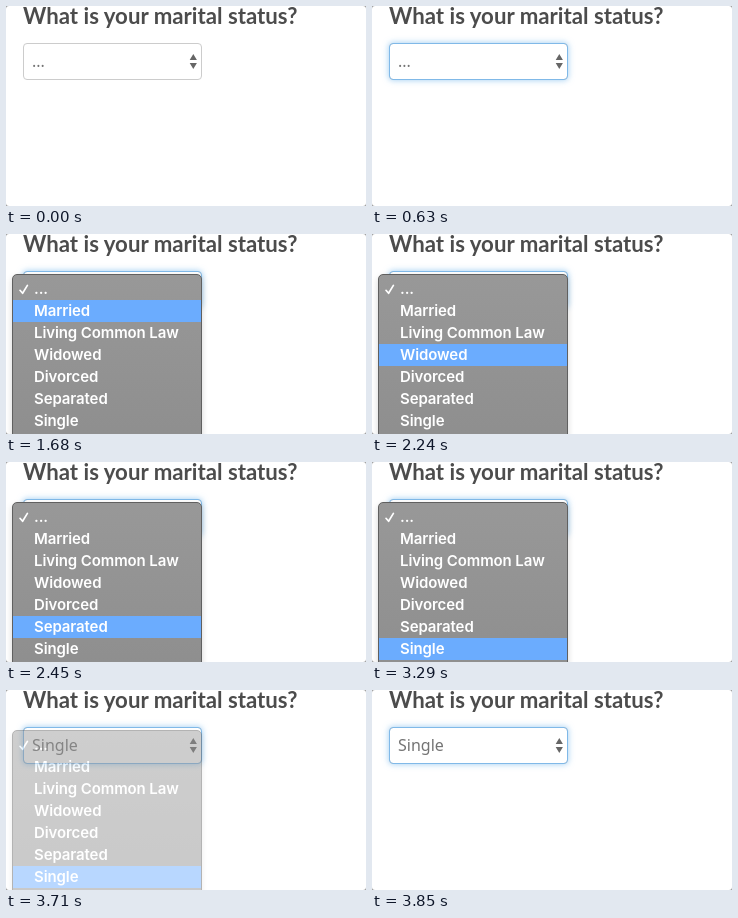
Animation of 360 by 200 pixels, one loop 4480 ms. Source, as an HTML page:

```html
<!DOCTYPE html>
<html lang="en">
<head>
<meta charset="utf-8">
<title>Marital status</title>
<style>
  html, body { margin: 0; width: 100%; height: 100%; overflow: hidden; background: #999; }
  .stage { position: absolute; left: 0; top: 0; width: 360px; height: 200px; overflow: hidden; background: #fff; border-radius: 3px; }
  .stage * { box-sizing: border-box; position: absolute; white-space: nowrap; }

  h1 { left: 17px; top: -4px; margin: 0; font: 700 22.23px/27px Lato, sans-serif; color: #4c4c4c; }

  .select { left: 17px; top: 37px; width: 179px; height: 37px; border: 1px solid #ccc; border-radius: 4px; background: #fff; }
  .focus { inset: -1px; border: 1px solid #80b9e8; border-radius: 4px; box-shadow: 0 0 6px rgba(102, 175, 233, .65); }
  .value { left: 8px; top: 0; font: 16px/34px "Noto Sans", sans-serif; color: #747474; }
  .arrows { left: 165px; top: 9px; width: 9px; height: 17px; fill: #666; }

  .popup { inset: 0; }
  .shade { left: 6px; top: 42px; width: 190px; height: 190px; border-radius: 5px; box-shadow: 0 1px 6px rgba(0, 0, 0, .17); }
  .menu { left: 6px; top: 40px; width: 190px; height: 190px; border: 1px solid #606060; border-radius: 5px; overflow: hidden;
          background: linear-gradient(#989898, #8d8d8d); }
  .bar { left: 0; top: 3px; width: 100%; height: 22px; background: #6bacfe; }
  .menu p { left: 21px; top: calc(3px + 22px * var(--row)); margin: 0; font: 600 15px/22px Inter, sans-serif; letter-spacing: -.1px; color: #fff; }
  .check { left: 5px; top: 8px; width: 12px; height: 13px; fill: none; stroke: #fff; stroke-width: 1.7; stroke-linecap: round; stroke-linejoin: round; }

  .focus, .before, .after, .popup, .bar { animation: 4480ms step-end infinite; }
  .focus { animation-name: focus; }
  .before { animation-name: before; }
  .after { animation-name: after; }
  .popup { animation-name: popup; }
  .bar { animation-name: hover; }

  @keyframes focus { 0% { opacity: 0 } 12.5% { opacity: .5 } 14.0625%, 100% { opacity: 1 } }
  @keyframes before { 0% { opacity: 1 } 79.6875%, 100% { opacity: 0 } }
  @keyframes after { 0% { opacity: 0 } 79.6875%, 100% { opacity: 1 } }
  @keyframes popup {
    0% { opacity: 0 }
    26.5625% { opacity: 1 }
    79.6875% { opacity: .96 }
    81.25% { opacity: .75 }
    82.8125% { opacity: .48 }
    84.375% { opacity: .2 }
    85.9375%, 100% { opacity: 0 }
  }
  @keyframes hover {
    0% { transform: none; opacity: 1 }
    37.5% { transform: translateY(22px) }
    43.75% { transform: translateY(44px) }
    48.4375% { transform: translateY(66px) }
    51.5625% { transform: translateY(88px) }
    54.6875% { transform: translateY(110px) }
    60.9375% { transform: translateY(132px); opacity: 1 }
    76.5625% { transform: translateY(132px); opacity: 0 }
    78.125%, 100% { transform: translateY(132px); opacity: 1 }
  }
</style>
</head>
<body>
<div class="stage">
  <h1>What is your marital status?</h1>
  <div class="select">
    <div class="focus"></div>
    <span class="value before">...</span>
    <span class="value after">Single</span>
    <svg class="arrows" viewBox="0 0 9 17"><path d="M.7 7 4.3 1 7.9 7ZM.7 10H7.9L4.3 16Z"/></svg>
  </div>
  <div class="popup">
    <div class="shade"></div>
    <div class="menu">
      <div class="bar"></div>
      <svg class="check" viewBox="0 0 12 13"><path d="M2 7.3 4.6 10.3 9.4 2.4"/></svg>
      <p style="--row:0">...</p>
      <p style="--row:1">Married</p>
      <p style="--row:2">Living Common Law</p>
      <p style="--row:3">Widowed</p>
      <p style="--row:4">Divorced</p>
      <p style="--row:5">Separated</p>
      <p style="--row:6">Single</p>
    </div>
  </div>
</div>
</body>
</html>
```
